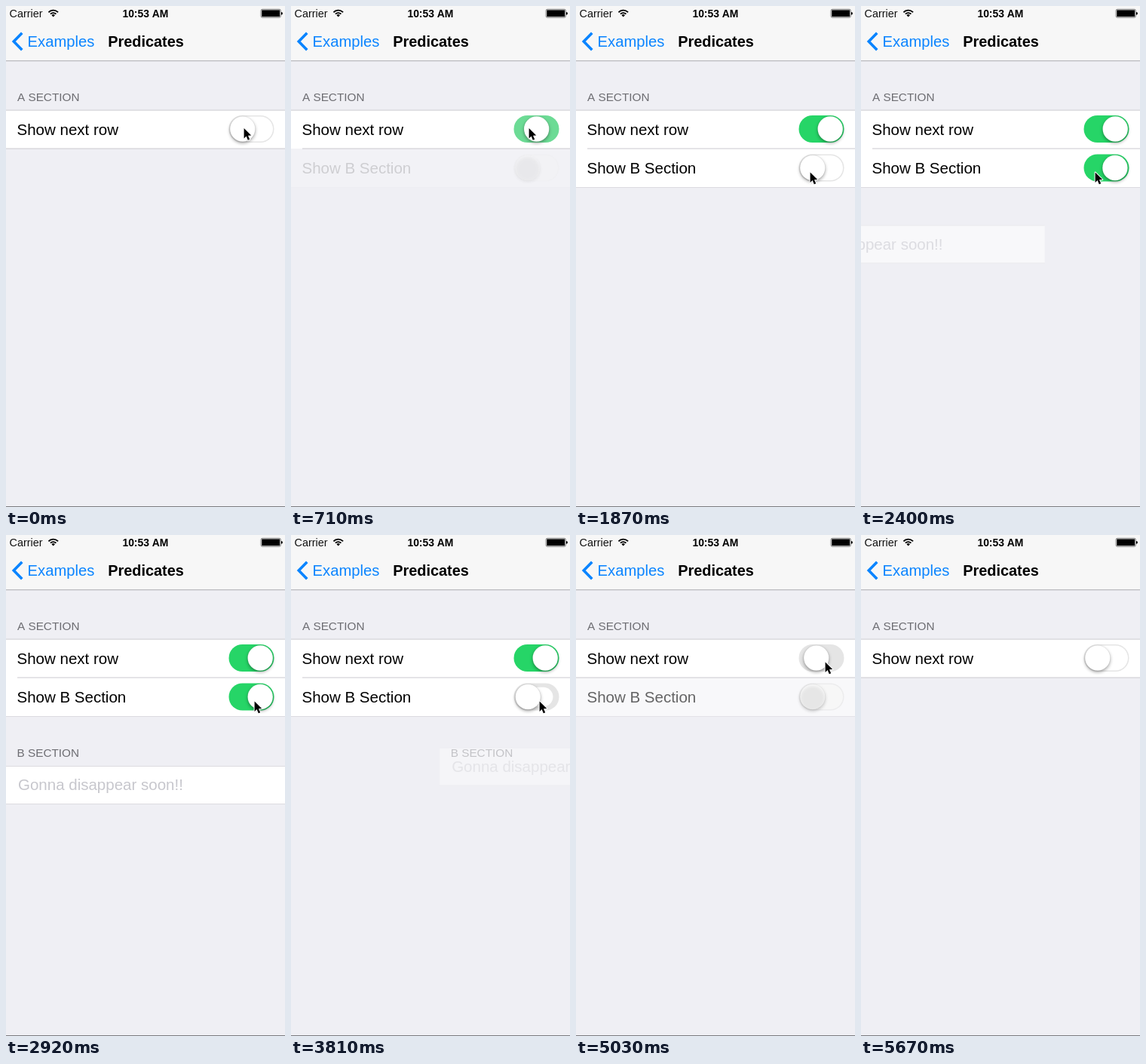
Write an HTML page with a canvas that moves like this. It is 370 by 664 pixels and loops after 5.91 s.

```html
<!DOCTYPE html>
<html lang="en">
<head>
<meta charset="utf-8">
<title>Predicates</title>
<style>
html, body { margin: 0; width: 100%; height: 100%; overflow: hidden; background: #efeff4; }
canvas { display: block; width: 370px; height: 664px; }
</style>
</head>
<body>
<canvas id="stage"></canvas>
<script>
const W = 370, H = 664, LOOP = 5910;
const canvas = document.getElementById('stage');
const ctx = canvas.getContext('2d');
const ratio = window.devicePixelRatio || 1;
canvas.width = W * ratio;
canvas.height = H * ratio;

const BLUE = '#0a84ff', BACK = '#efeff4', LINE = '#cbcacf', SOFT = '#dcdbe0';
const GREEN = [38, 213, 103], GREY = [229, 229, 229];
const FONT = '"Liberation Sans", Arial, sans-serif';

// Start times in ms
const switchA = { on: 580, off: 4850 };
const switchB = { on: 2160, off: 3575 };
const rowB = { show: 635, hide: 4900 };
const section = { show: 2220, hide: 3655 };

// Pointer tip: time, x, y
const path = [
  [0, 315, 161], [1060, 315, 161], [1180, 320.5, 182], [1350, 327.5, 203],
  [1580, 320, 219.5], [1700, 320, 219.5], [1870, 310, 219.5], [2700, 310, 219.5],
  [2750, 314, 219], [2920, 329, 219.5], [4130, 329, 219.5], [4220, 329, 184],
  [4440, 330, 167.5], [5130, 330, 167.5], [5250, 334, 260], [5350, 345, 500],
  [5440, 354, 640], [5520, 361, 655], [5640, 373, 670], [LOOP, 373, 670]
];

const clamp = v => Math.max(0, Math.min(1, v));
const ease = u => (1 - Math.cos(Math.PI * clamp(u))) / 2;
const mix = (a, b, k) => `rgb(${a.map((v, i) => Math.round(v + (b[i] - v) * k))})`;

function rect(x, y, w, h, color) {
  ctx.fillStyle = color;
  ctx.fillRect(x, y, w, h);
}

function text(str, x, y, size, color, weight = '') {
  ctx.font = `${weight} ${size}px ${FONT}`;
  ctx.fillStyle = color;
  ctx.fillText(str, x, y);
}

function pill(cx, cy, w, h, color) {
  ctx.fillStyle = color;
  ctx.beginPath();
  ctx.roundRect(cx - w / 2, cy - h / 2, w, h, h / 2);
  ctx.fill();
}

function drawSwitch(cy, t, times) {
  const turningOff = t >= times.off;
  const u = clamp((t - (turningOff ? times.off : times.on)) / 260);
  const p = ease(u);
  const pos = turningOff ? 1 - p : p;
  const tint = turningOff ? 1 - clamp(p * 1.5) : clamp(p * 1.25);
  const hole = turningOff ? clamp((u - 0.6) / 0.4) : 1 - clamp(u / 0.4);
  const cx = 325.5;

  pill(cx, cy, 60, 36, mix(GREY, GREEN, tint));
  if (hole > 0) pill(cx, cy, 57 * hole, 33 * hole, '#fff');

  const x = 313.8 + 23.4 * pos;
  ctx.save();
  ctx.shadowColor = 'rgba(0,0,0,0.36)';
  ctx.shadowBlur = 4 * ratio;
  ctx.shadowOffsetY = 2 * ratio;
  pill(x, cy, 33.4, 33.4, '#fff');
  ctx.restore();
  ctx.strokeStyle = 'rgba(0,0,0,0.1)';
  ctx.lineWidth = 0.6;
  ctx.beginPath();
  ctx.arc(x, cy, 16.8, 0, Math.PI * 2);
  ctx.stroke();
}

function drawBars() {
  rect(0, 0, W, 72, '#f7f7f7');
  rect(0, 72, W, 1.3, '#bcbcc0');
  text('Carrier', 4.5, 15, 14.4, '#111');
  text('10:53 AM', 154.4, 15, 13.9, '#000', 'bold');

  // Wi-Fi
  ctx.strokeStyle = '#000';
  ctx.lineWidth = 1.9;
  for (const r of [5.1, 8.6]) {
    ctx.beginPath();
    ctx.arc(62.7, 14.2, r, -Math.PI * 0.76, -Math.PI * 0.24);
    ctx.stroke();
  }
  ctx.fillStyle = '#000';
  ctx.beginPath();
  ctx.moveTo(62.7, 14.6);
  ctx.arc(62.7, 14.2, 3, -Math.PI * 0.76, -Math.PI * 0.24);
  ctx.fill();

  // Battery
  ctx.strokeStyle = '#555';
  ctx.lineWidth = 0.7;
  ctx.beginPath();
  ctx.roundRect(338, 4.3, 26.4, 11, 2);
  ctx.stroke();
  rect(339.2, 5.4, 24, 8.8, '#000');
  ctx.beginPath();
  ctx.arc(365, 9.8, 1.9, -Math.PI / 2, Math.PI / 2);
  ctx.fill();

  ctx.strokeStyle = BLUE;
  ctx.lineWidth = 3.6;
  ctx.beginPath();
  ctx.moveTo(21.3, 35.8);
  ctx.lineTo(10.3, 47);
  ctx.lineTo(21.3, 58.2);
  ctx.stroke();
  text('Examples', 28.6, 54.3, 20.2, BLUE);
  text('Predicates', 135.2, 54.3, 19.9, '#000', 'bold');
}

function drawRows(t) {
  const expanded = t >= rowB.show && t < rowB.hide;
  const alpha = ease((t - rowB.show) / 300) * (1 - ease((t - rowB.hide) / 300));

  text('A SECTION', 15, 126.4, 15.3, '#6d6d72');
  rect(0, 138, W, 51, '#fff');
  rect(0, 137.6, W, 1, LINE);
  text('Show next row', 14.5, 170.7, 20.5, '#000');
  drawSwitch(163, t, switchA);

  if (alpha > 0) {
    ctx.globalAlpha = alpha;
    rect(0, 189, W, 51, '#fff');
    rect(0, 240, W, 1, SOFT);
    text('Show B Section', 14.5, 222.3, 20.5, '#000');
    drawSwitch(214.5, t, switchB);
    ctx.globalAlpha = 1;
  }
  const inset = expanded ? 15 : 0;
  rect(inset, 188.5, W - inset, 1, LINE);
}

// The section enters from the left and leaves to the right.
function drawSection(t) {
  const enter = ease((t - section.show) / 300);
  const leave = ease((t - section.hide) / 300);
  const away = leave > 0 ? leave : 1 - enter;
  if (away >= 1) return;
  const dx = leave > 0 ? 371 * leave : -371 * away;

  ctx.save();
  ctx.globalAlpha = Math.pow(1 - away, 1.35);
  ctx.translate(dx, -46 * away);
  rect(0, 306, W, 51, '#fff');
  rect(0, 306, W, 1, SOFT);
  rect(0, 356, W, 1, SOFT);
  text('Gonna disappear soon!!', 16, 338.4, 20.5, '#c7c7cd');
  ctx.translate(0, 46 * away);
  text('B SECTION', 14.6, 294.4, 15.3, '#6d6d72');
  ctx.restore();
}

function drawPointer(t) {
  const i = path.findIndex(k => k[0] > t);
  const [t0, x0, y0] = path[i - 1], [t1, x1, y1] = path[i];
  const k = (t - t0) / (t1 - t0);
  ctx.save();
  ctx.translate(x0 + (x1 - x0) * k + 0.6, y0 + (y1 - y0) * k + 1);
  ctx.beginPath();
  ctx.moveTo(0, 0);
  for (const [x, y] of [[0, 13.4], [3, 10.6], [5.2, 15.8], [7.6, 14.8], [5.4, 9.8], [9.6, 9.6]]) {
    ctx.lineTo(x, y);
  }
  ctx.closePath();
  ctx.strokeStyle = '#fff';
  ctx.lineWidth = 2;
  ctx.lineJoin = 'round';
  ctx.stroke();
  ctx.fillStyle = '#000';
  ctx.fill();
  ctx.restore();
}

const begin = performance.now();
function frame(now) {
  const t = Math.max(0, now - begin) % LOOP;
  ctx.setTransform(ratio, 0, 0, ratio, 0, 0);
  rect(0, 0, W, H, BACK);
  drawBars();
  drawRows(t);
  drawSection(t);
  rect(0, 663, W, 1, '#7c7c7f');
  drawPointer(t);
  requestAnimationFrame(frame);
}
frame(begin);
</script>
</body>
</html>
```
